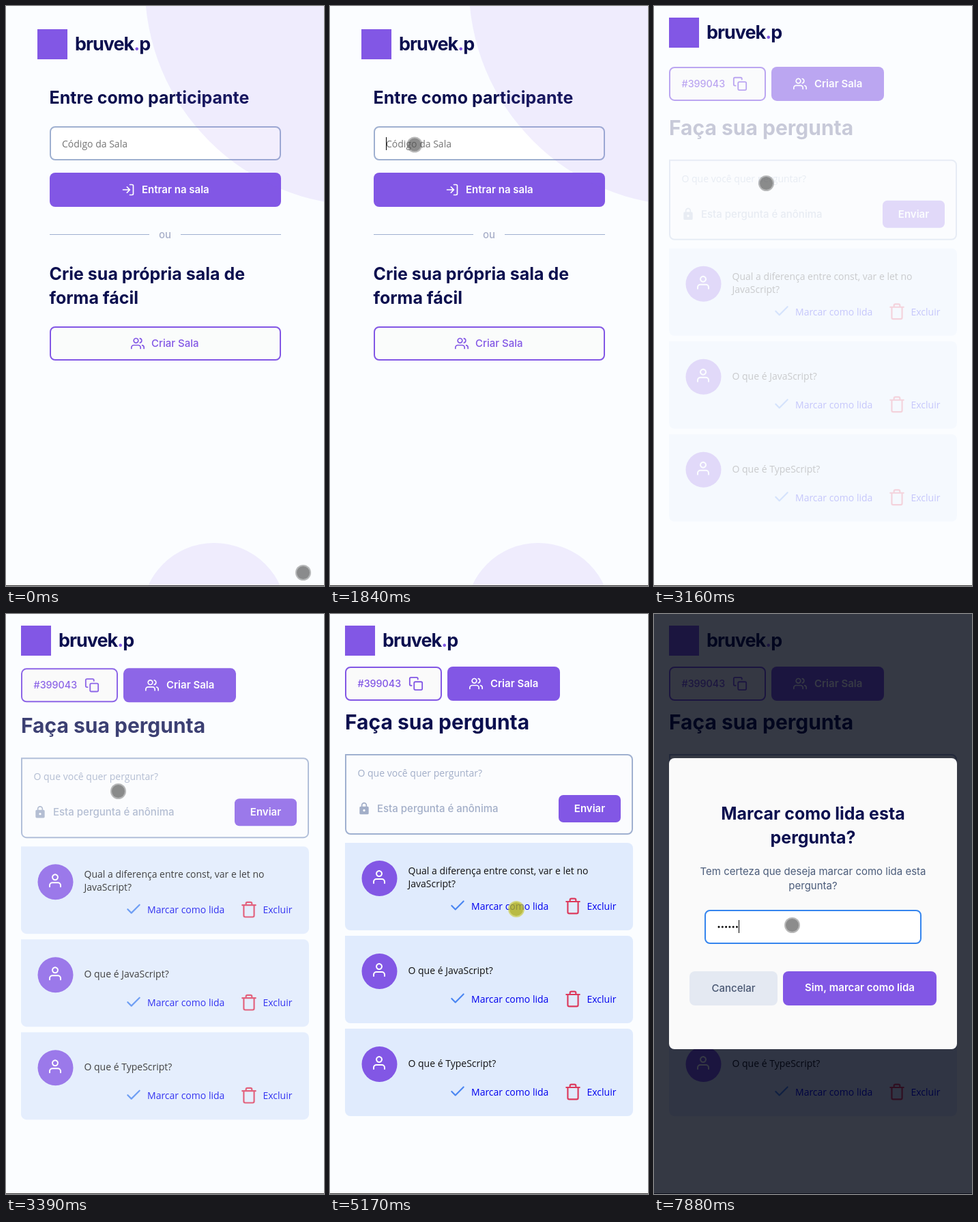
Animation of 466x849 px, one loop 8 s. Source, as an HTML page with a canvas:

```html
<!DOCTYPE html>
<html lang="pt-BR">
<head>
<meta charset="utf-8">
<title>Sala de perguntas</title>
<style>
  html, body { margin: 0; width: 100%; height: 100%; overflow: hidden; background: #fbfdff; }
  canvas { display: block; }
</style>
</head>
<body>
<canvas id="stage" width="466" height="849"></canvas>
<script>
const W = 466, H = 849, LOOP = 8000;
const screenCtx = document.getElementById('stage').getContext('2d');
const layer = document.createElement('canvas');
layer.width = W;
layer.height = H;
const layerCtx = layer.getContext('2d');
let ctx = screenCtx;

const PAGE = '#fbfdff', PURPLE = '#8257e5', NAVY = '#0b0f4f', LINE = '#9fb0d0', MUTED = '#a2aec8';
const HEADING = '700 25px Inter, sans-serif';
const LABEL = '500 15px Inter, sans-serif';
const STRONG = '600 15px Inter, sans-serif';
const BODY = '400 14px "Open Sans", sans-serif';

const ICONS = {
  enter: 'M15 3h4a2 2 0 0 1 2 2v14a2 2 0 0 1-2 2h-4M10 17l5-5-5-5M15 12H3',
  users: 'M17 21v-2a4 4 0 0 0-4-4H5a4 4 0 0 0-4 4v2M9 3a4 4 0 1 0 .01 0M23 21v-2a4 4 0 0 0-3-3.87M16 3.13a4 4 0 0 1 0 7.75',
  user: 'M20 21v-2a4 4 0 0 0-4-4H8a4 4 0 0 0-4 4v2M12 3a4 4 0 1 0 .01 0',
  copy: 'M11 9h9a2 2 0 0 1 2 2v9a2 2 0 0 1-2 2h-9a2 2 0 0 1-2-2v-9a2 2 0 0 1 2-2zM5 15H4a2 2 0 0 1-2-2V4a2 2 0 0 1 2-2h9a2 2 0 0 1 2 2v1',
  check: 'M20 6L9 17l-5-5',
  trash: 'M3 6h18M19 6v14a2 2 0 0 1-2 2H7a2 2 0 0 1-2-2V6M8 6V4a2 2 0 0 1 2-2h4a2 2 0 0 1 2 2v2',
  lock: 'M18 8h-1V6A5 5 0 0 0 7 6v2H6a2 2 0 0 0-2 2v10a2 2 0 0 0 2 2h12a2 2 0 0 0 2-2V10a2 2 0 0 0-2-2zM12 17a2 2 0 1 1 0-4 2 2 0 0 1 0 4zM9 8V6a3 3 0 0 1 6 0v2z'
};
for (const name in ICONS) ICONS[name] = new Path2D(ICONS[name]);

const clamp = x => Math.min(1, Math.max(0, x));
const progress = (t, start, end) => clamp((t - start) / (end - start));
const smooth = x => x * x * (3 - 2 * x);
const between = (t, start, end) => t >= start && t < end;

// cubic-bezier(.25, .1, .25, 1), the CSS "ease" curve
function ease(x) {
  if (x <= 0 || x >= 1) return clamp(x);
  const curve = (s, a, b) => 3 * a * s * (1 - s) ** 2 + 3 * b * s * s * (1 - s) + s ** 3;
  let lo = 0, hi = 1;
  for (let i = 0; i < 24; i++) {
    const mid = (lo + hi) / 2;
    if (curve(mid, .25, .25) < x) lo = mid; else hi = mid;
  }
  return curve(lo, .1, 1);
}

function text(str, x, y, font, color, align = 'left') {
  ctx.font = font;
  ctx.fillStyle = color;
  ctx.textAlign = align;
  ctx.fillText(str, x, y);
}

function rect(x, y, w, h, color) {
  ctx.fillStyle = color;
  ctx.fillRect(x, y, w, h);
}

function disc(x, y, r, color) {
  ctx.beginPath();
  ctx.arc(x, y, r, 0, Math.PI * 2);
  ctx.fillStyle = color;
  ctx.fill();
}

function box(x, y, w, h, radius, fill, border) {
  const inset = border ? 1 : 0;
  ctx.beginPath();
  ctx.roundRect(x + inset, y + inset, w - 2 * inset, h - 2 * inset, radius);
  ctx.fillStyle = fill;
  ctx.fill();
  if (border) {
    ctx.strokeStyle = border;
    ctx.lineWidth = 2;
    ctx.stroke();
  }
}

function icon(name, x, y, size, color, filled) {
  ctx.save();
  ctx.translate(x, y);
  ctx.scale(size / 24, size / 24);
  ctx.fillStyle = ctx.strokeStyle = color;
  ctx.lineWidth = 2;
  ctx.lineCap = ctx.lineJoin = 'round';
  if (filled) ctx.fill(ICONS[name], 'evenodd');
  else ctx.stroke(ICONS[name]);
  ctx.restore();
}

// Draws a group on its own layer, so that it fades as a whole.
function fade(alpha, dy, draw) {
  ctx = layerCtx;
  ctx.clearRect(0, 0, W, H);
  ctx.save();
  ctx.translate(0, dy);
  draw();
  ctx.restore();
  ctx = screenCtx;
  ctx.globalAlpha = alpha;
  ctx.drawImage(layer, 0, 0);
  ctx.globalAlpha = 1;
}

// The group fades in while rising 25 px.
function rise(t, start, draw) {
  const p = ease(progress(t, start, start + 700));
  fade(p, 25 * (1 - p), draw);
}

const caret = (x, y) => rect(x, y, 1, 19, '#000');

function brand(x, y) {
  rect(x, y, 44, 44, PURPLE);
  ctx.letterSpacing = '-1px';
  let left = x + 55;
  for (const [part, color] of [['bruvek', NAVY], ['.', PURPLE], ['p', NAVY]]) {
    text(part, left, y + 31, '700 27px Inter, sans-serif', color);
    left += ctx.measureText(part).width;
  }
  ctx.letterSpacing = '0px';
}

function drawEntry(t) {
  brand(46, 34);
  text('Entre como participante', 63.5, 143, HEADING, NAVY);
  box(64, 176, 339, 50, 7, '#fff', LINE);

  const code = t < 1900 ? '' : '399043';
  text(code || 'Código da Sala', 82, 207, BODY, code ? '#111' : '#757575');
  if (between(t, 780, 1310) || between(t, 1840, 2440))
    caret(82 + (code ? ctx.measureText(code).width : 0), 192);

  const shade = 1 - .1 * progress(t, 2290, 2490);
  box(64, 244, 339, 50, 8, `rgb(${130 * shade}, ${87 * shade}, ${229 * shade})`);
  icon('enter', 169, 259, 20, '#fff');
  text('Entrar na sala', 199, 274, STRONG, '#fff');

  rect(64, 334, 146, 1, LINE);
  rect(256, 334, 147, 1, LINE);
  text('ou', 224, 340, LABEL, '#a8afc9');

  text('Crie sua própria sala de', 63.5, 401, HEADING, NAVY);
  text('forma fácil', 63.5, 436, HEADING, NAVY);
  box(64, 469, 339, 50, 7, '#fafcfb', PURPLE);
  icon('users', 183, 484, 20, PURPLE);
  text('Criar Sala', 213, 499, LABEL, PURPLE);

  disc(525.5, -30, 322, 'rgba(130, 87, 229, .1)');
  disc(305, 892, 106, 'rgba(130, 87, 229, .1)');
}

function drawQuestion(y, lines) {
  box(22, y, 422, 128, [0, 8, 8, 8], '#e0ebfd');
  disc(72.5, y + 52, 26, PURPLE);
  icon('user', 60, y + 38, 24, '#fff');
  const first = y + (lines.length > 1 ? 46 : 56);
  lines.forEach((line, i) => text(line, 114.5, first + 19 * i, BODY, '#111'));
  icon('check', 174, y + 79, 26, '#4a86f2');
  text('Marcar como lida', 207, y + 98, BODY, '#0000ee');
  icon('trash', 343, y + 79.5, 26, '#dc3a5d');
  text('Excluir', 376.5, y + 98, BODY, '#0000ee');
}

function drawRoom(t) {
  brand(22, 17);
  rise(t, 2948, () => {
    box(22, 77, 142, 50, 7, '#fafafa', PURPLE);
    text('#399043', 40.5, 107, '500 14.3px Inter, sans-serif', PURPLE);
    icon('copy', 115, 91, 22, PURPLE);
    box(172, 77, 165, 50, 8, PURPLE);
    icon('users', 204, 92, 20, '#fff');
    text('Criar Sala', 235, 107, STRONG, '#fff');
  });
  rise(t, 3048, () => {
    text('Faça sua pergunta', 22, 169, '700 30px Inter, sans-serif', NAVY);
    box(22, 205, 422, 118, [0, 7, 7, 7], '#fbfcfe', LINE);
    text('O que você quer perguntar?', 40.5, 238, BODY, MUTED);
    icon('lock', 40, 275, 20, MUTED, true);
    text('Esta pergunta é anônima', 69, 290, LABEL, MUTED);
    box(335, 265, 91, 40, 7, PURPLE);
    text('Enviar', 380.5, 290, STRONG, '#fff', 'center');
    drawQuestion(335, ['Qual a diferença entre const, var e let no', 'JavaScript?']);
    drawQuestion(471, ['O que é JavaScript?']);
    drawQuestion(607, ['O que é TypeScript?']);
  });
}

function drawModal(t) {
  rect(0, 0, W, H, 'rgba(1, 5, 18, .79)');
  box(22, 211, 422, 426, 8, '#fafafa');
  const copy = '400 15px Inter, sans-serif';
  text('Marcar como lida esta', 233, 301, HEADING, NAVY, 'center');
  text('pergunta?', 233, 336, HEADING, NAVY, 'center');
  text('Tem certeza que deseja marcar como lida esta', 233, 382, copy, '#4b5c7a', 'center');
  text('pergunta?', 233, 403, copy, '#4b5c7a', 'center');

  box(74, 433, 318, 50, 7, '#fff', '#3585ee');
  const typed = [6720, 6800, 7120, 7350, 7580, 7880].filter(time => t >= time).length;
  if (!typed) text('Digite sua senha', 92, 463, BODY, '#757575');
  for (let i = 0; i < typed; i++) disc(95 + 5.3 * i, 458, 1.5, '#000');
  if (typed || between(t, 5860, 6420)) caret(Math.round(92 + 5.33 * typed), 448);

  box(52, 523, 129, 50, 8, '#e4e9f2');
  text('Cancelar', 116.5, 553, LABEL, '#4a5873', 'center');
  box(189, 523, 225, 50, 8, PURPLE);
  text('Sim, marcar como lida', 301.5, 552, STRONG, '#fff', 'center');
}

const MOVES = [
  { start: 20, end: 780, x: 127, y: 204.5 },
  { start: 850, end: 1080, x: 124, y: 203 },
  { start: 2030, end: 2480, x: 164.5, y: 259.5 },
  { start: 4020, end: 4870, x: 272, y: 410 },
  { start: 4870, end: 5020, x: 273, y: 432 },
  { start: 5510, end: 5860, x: 202.5, y: 455.5 }
];
const CLICKS = [[780, 1060], [2480, 2700], [5020, 5350]];

function drawPointer(t) {
  let x = 435.5, y = 829.5;
  for (const move of MOVES) {
    const p = smooth(progress(t, move.start, move.end));
    x += (move.x - x) * p;
    y += (move.y - y) * p;
  }
  if (CLICKS.some(([down, up]) => between(t, down, up))) {
    disc(x, y, 12, 'rgba(200, 200, 40, .6)');
    disc(x, y, 10, 'rgba(160, 160, 10, .5)');
  } else {
    disc(x, y, 11.5, 'rgba(80, 80, 80, .4)');
    disc(x, y, 9.5, 'rgba(80, 80, 80, .43)');
  }
}

function frame(now) {
  const t = now % LOOP;
  rect(0, 0, W, H, PAGE);
  if (t < 2930) drawEntry(t);
  else drawRoom(t);
  rect(0, 848, W, 1, '#333');
  if (t > 5190) fade(progress(t, 5190, 5400), 0, () => drawModal(t));
  drawPointer(t);
  requestAnimationFrame(frame);
}
requestAnimationFrame(frame);
</script>
</body>
</html>
```
